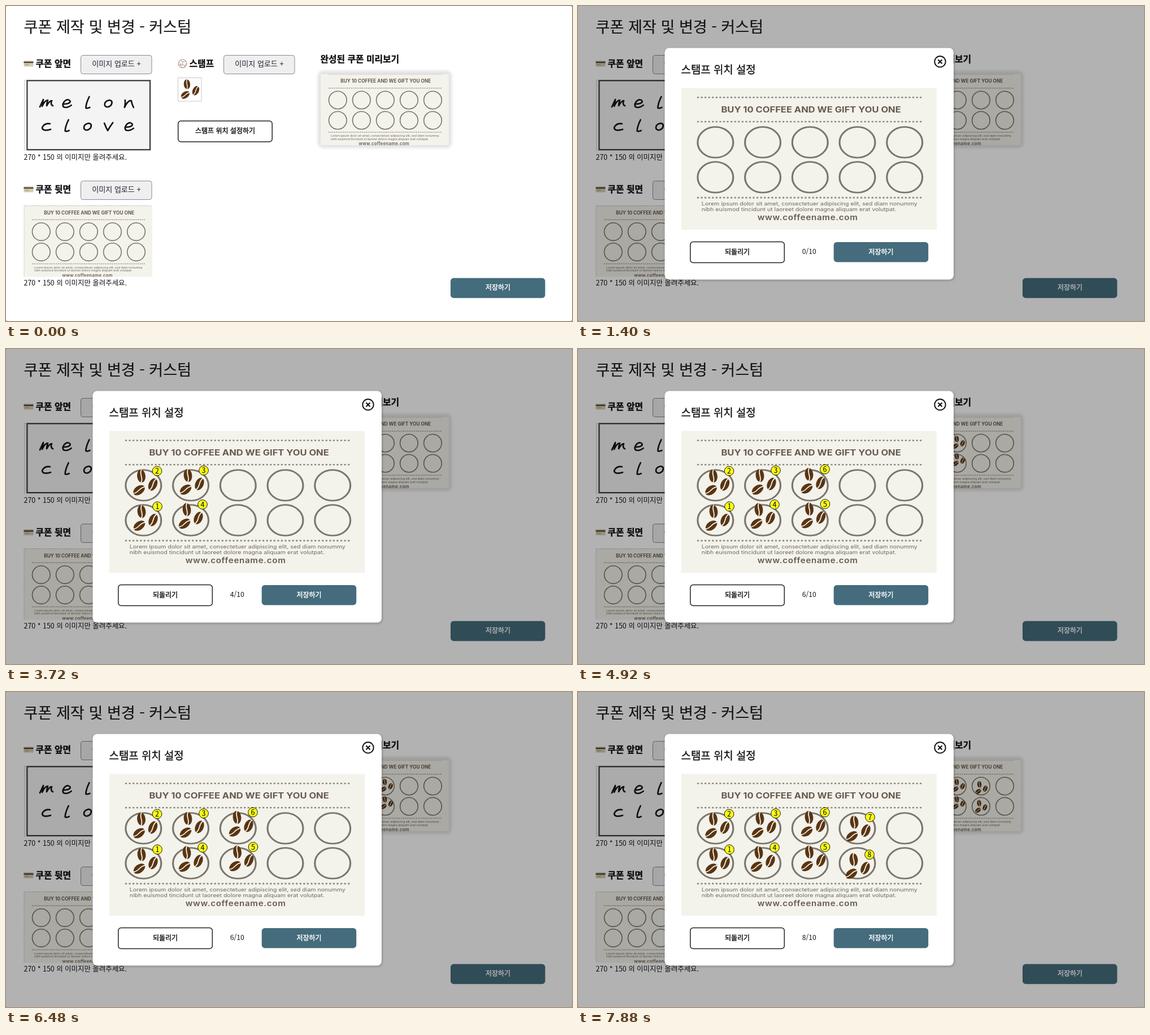
Write an HTML page that moves like this. It is 1002 px wide and 559 px high and loops after 8000 ms.

```html
<!DOCTYPE html>
<html lang="ko">
<head>
<meta charset="utf-8">
<title>쿠폰 제작</title>
<style>
  html, body { margin: 0; width: 100%; height: 100%; overflow: hidden; background: #888; }
  svg { display: block; width: 1002px; height: 559px; }
  text { font-family: "Noto Sans CJK KR", "Noto Sans CJK", sans-serif; font-size: 12px; fill: #111; }
  .h1 { font-size: 27.1px; fill: #1c1c1c; stroke: #1c1c1c; stroke-width: .2; }
  .h2 { font-size: 18.9px; stroke: #111; stroke-width: .3; }
  .label { font-size: 15.8px; font-weight: 700; stroke: #111; stroke-width: .35; }
  .note { font-size: 12.45px; }
  .count { font-size: 12.2px; text-anchor: middle; }
  .btn text { text-anchor: middle; stroke-width: .4; }
  .upload text { font-size: 13px; fill: #1c2230; }
  .upload rect { fill: #efefef; stroke: #858a92; }
  .outline rect { fill: #fff; stroke: #222; stroke-width: 1.5; }
  .outline text { stroke: #111; }
  .save rect { fill: #446c7c; }
  .save text { fill: #fff; stroke: #fff; }
  .card text { font-family: Inter, sans-serif; fill: #66594c; }
  .card .head { font-size: 8.3px; font-weight: 700; text-anchor: middle; }
  .card .fine { font-size: 5.3px; fill: #6f6a61; }
  .card .url { font-size: 7.6px; font-weight: 600; letter-spacing: .35px; text-anchor: middle; }
  .dots { fill: none; stroke: #8d897f; stroke-width: 1.5; stroke-dasharray: 1.6 1.7; }
  .ring { fill: none; stroke: #7b766d; stroke-width: 1.6; }
  .pen { fill: none; stroke: #141414; stroke-width: 2.7; stroke-linecap: round; stroke-linejoin: round; }
  .pressed { transform: scale(.985); transform-box: fill-box; transform-origin: center; opacity: .72; }
  .badge circle { fill: #ffff14; stroke: #111; }
  .badge text { text-anchor: middle; font-size: 12.5px; fill: #000; }
</style>
</head>
<body>
<svg viewBox="0 0 1002 559">
  <defs>
    <filter id="blur" x="-10%" y="-15%" width="120%" height="130%"><feGaussianBlur stdDeviation="2.7"/></filter>
    <filter id="soft" x="-5%" y="-5%" width="110%" height="110%"><feGaussianBlur stdDeviation="2"/></filter>
    <clipPath id="crop"><rect y="10" width="227" height="126"/></clipPath>

    <g id="card" class="card">
      <rect width="227" height="146" fill="#f3f2eb"/>
      <path class="dots" d="M14 9.7H214M14 34.7H214M14 113H214"/>
      <text class="head" x="115.3" y="25">BUY 10 COFFEE AND WE GIFT YOU ONE</text>
      <g id="rings"></g>
      <text class="fine" x="18" y="121">Lorem ipsum dolor sit amet, consectetuer adipiscing elit, sed diam nonummy</text>
      <text class="fine" x="18" y="126.7">nibh euismod tincidunt ut laoreet dolore magna aliquam erat volutpat.</text>
      <text class="url" x="112.3" y="136">www.coffeename.com</text>
    </g>

    <g id="bean">
      <ellipse rx="7.4" ry="11.5" fill="#593512"/>
      <path d="M1.5-11.5C-4-3 4 3-1.5 11.5" fill="none" stroke="#f6f4ef" stroke-width="1.8"/>
    </g>
    <g id="beans">
      <use href="#bean" transform="translate(-7 -14) rotate(-6)"/>
      <use href="#bean" transform="translate(13.5 1) rotate(24)"/>
      <use href="#bean" transform="translate(-11 11) rotate(53)"/>
    </g>
    <g id="wallet">
      <rect width="17" height="10.5" rx="1" fill="#d5ccb0"/>
      <rect y="1.8" width="17" height="2.4" fill="#4a4536"/>
      <path d="M2 7.2H9" stroke="#948b70"/>
    </g>
  </defs>

  <rect width="1002" height="559" rx="3" fill="#fff"/>
  <text class="h1" x="31.5" y="47.3">쿠폰 제작 및 변경 - 커스텀</text>

  <use href="#wallet" x="31.5" y="97"/>
  <text class="label" x="52.5" y="108.3">쿠폰 앞면</text>
  <g class="btn upload"><rect x="132.5" y="87.5" width="125.5" height="33" rx="4"/><text x="195.5" y="107.3">이미지 업로드 +</text></g>
  <rect x="32" y="131" width="226" height="126" fill="#f4f4f4"/>
  <path d="M32.5 257V131.5H258" fill="none" stroke="#c4c4c4" stroke-dasharray="2 1"/>
  <rect x="37.4" y="132.4" width="217.6" height="122.6" fill="#f4f4f4" stroke="#383838" stroke-width="2.2"/>
  <g id="lettering" class="pen"></g>
  <text class="note" x="31.5" y="273">270 * 150 의 이미지만 올려주세요.</text>

  <use href="#wallet" x="31.5" y="320"/>
  <text class="label" x="52.5" y="331.3">쿠폰 뒷면</text>
  <g class="btn upload"><rect x="132.5" y="310.5" width="125.5" height="33" rx="4"/><text x="195.5" y="330.3">이미지 업로드 +</text></g>
  <g transform="translate(32 344.6)" clip-path="url(#crop)"><use href="#card"/></g>
  <path d="M32 480V354.5H258" fill="none" stroke="#c4c4c0" stroke-dasharray="2 1"/>
  <text class="note" x="31.5" y="496.3">270 * 150 의 이미지만 올려주세요.</text>

  <g fill="none" stroke="#a3877b">
    <circle cx="312.5" cy="102.3" r="7.5"/>
    <path d="M309 96l4 3 5-1M313 99l-1 5-6 1M312 104l5 2 2-4M317 106l-3 4M307 99l2 6 2 4" stroke-width=".9"/>
  </g>
  <text class="label" x="324.5" y="108.3">스탬프</text>
  <g class="btn upload"><rect x="385.5" y="87.5" width="125.5" height="33" rx="4"/><text x="448.5" y="107.3">이미지 업로드 +</text></g>
  <rect x="304.5" y="127.5" width="41.5" height="41.5" fill="#fff" stroke="#c8c8c8"/>
  <use href="#beans" transform="translate(325.7 149.5) scale(.76)"/>
  <g id="place" class="btn outline"><rect x="304.7" y="204" width="166.5" height="37" rx="5"/><text x="388" y="225.7">스탬프 위치 설정하기</text></g>

  <text class="label" x="556.5" y="100">완성된 쿠폰 미리보기</text>
  <rect x="552" y="115" width="237" height="137" rx="9" fill="#e2e2e2" filter="url(#blur)"/>
  <g transform="translate(557 111)" clip-path="url(#crop)"><use href="#card"/></g>
  <g id="preview" transform="translate(557 121) scale(.502) translate(-183 -145.5)"></g>
  <g class="btn save"><rect x="787" y="482.8" width="167.5" height="35.4" rx="5.5"/><text x="871" y="503.8">저장하기</text></g>

  <g id="modal" visibility="hidden">
    <rect width="1002" height="559" rx="3" opacity=".3"/>
    <rect x="154" y="76" width="512" height="411" rx="8" opacity=".25" filter="url(#soft)"/>
    <rect x="153.5" y="74.5" width="511.5" height="411" rx="8" fill="#fff"/>
    <text class="h2" x="182.5" y="119.5">스탬프 위치 설정</text>
    <g fill="none" stroke="#111" stroke-width="1.9">
      <circle cx="641" cy="98.7" r="9.7"/>
      <path d="M637.5 95.2l7 7m0-7l-7 7" stroke-width="2.2"/>
    </g>
    <use href="#card" transform="translate(183 145.5) scale(1.991 1.722)"/>
    <g id="stamps"></g>
    <g id="undo" class="btn outline"><rect x="198.8" y="418.5" width="166.5" height="37" rx="5"/><text x="282" y="440.5">되돌리기</text></g>
    <text id="count" class="count" x="409.3" y="440.3">0/10</text>
    <g class="btn save"><rect x="452.7" y="419" width="167.5" height="35.4" rx="5.5"/><text x="536.5" y="440.5">저장하기</text></g>
  </g>
</svg>
<script>
const LOOP = 8000, OPEN = 1400, UNDO = 6440;
const $ = id => document.getElementById(id);

function add(parent, tag, attrs) {
  const el = document.createElementNS("http://www.w3.org/2000/svg", tag);
  for (const key in attrs) el.setAttribute(key, attrs[key]);
  parent.append(el);
  return el;
}

for (let i = 0; i < 10; i++) {
  add($("rings"), "circle", { class: "ring", cx: 30.3 + 42.05 * (i % 5), cy: i < 5 ? 56 : 92, r: 15.8 });
}

const glyphs = {
  m: "M-11 6L-5-7Q-6 0-7 5Q-2-6 3-6Q1 0 1 4Q6-5 10-5Q7 2 12 4",
  e: "M-7 1Q6 1 6-4Q3-9-3-5Q-9 1-6 6Q0 9 8 3",
  l: "M3-12Q-3 0-3 8Q0 9 4 7",
  o: "M2-6Q-8-4-6 4Q-2 9 5 3Q9-5 2-6",
  n: "M-7-6Q-6 0-8 7Q-2-6 4-5Q5 1 8 7",
  c: "M7-5Q-3-7-7 2Q-6 9 8 5",
  v: "M-7-6Q-4 2-1 7Q3 0 8-7"
};
["melon", "clove"].forEach((word, row) => [...word].forEach((ch, i) =>
  add($("lettering"), "path", { d: glyphs[ch], transform: `translate(${71 + 36.7 * i} ${row ? 214 : 173})` })));

// x, y, number, time placed, time removed
const stamps = [
  [247, 302.5, 1, 2440],
  [246.5, 239.5, 2, 2800],
  [329, 238.5, 3, 3280],
  [327, 299, 4, 3680],
  [416.5, 298, 5, 4400],
  [416, 236.5, 6, 4920],
  [476, 221, 7, 5600, UNDO],
  [496, 245, 7, 7400],
  [495, 311.5, 8, 7880]
].map(([x, y, number, from, to = LOOP]) => {
  const transform = `translate(${x} ${y})`;
  const mini = add($("preview"), "use", { href: "#beans", transform });
  const full = add($("stamps"), "g", { transform });
  add(full, "use", { href: "#beans" });
  const badge = add(full, "g", { class: "badge", transform: "translate(21 -23)" });
  add(badge, "circle", { r: 8.3 });
  add(badge, "text", { y: 4.5 }).textContent = number;
  return { parts: [mini, full], from, to };
});

function draw(now) {
  const t = now % LOOP;
  let placed = 0;
  for (const { parts, from, to } of stamps) {
    const on = t >= from && t < to;
    placed += on;
    for (const part of parts) part.style.display = on ? "" : "none";
  }
  $("count").textContent = placed + "/10";
  $("modal").setAttribute("visibility", t >= OPEN ? "visible" : "hidden");
  $("place").classList.toggle("pressed", t >= 1320 && t < OPEN);
  $("undo").classList.toggle("pressed", t >= 6400 && t < UNDO);
}

function tick() {
  draw(performance.now());
  requestAnimationFrame(tick);
}
tick();
</script>
</body>
</html>
```
